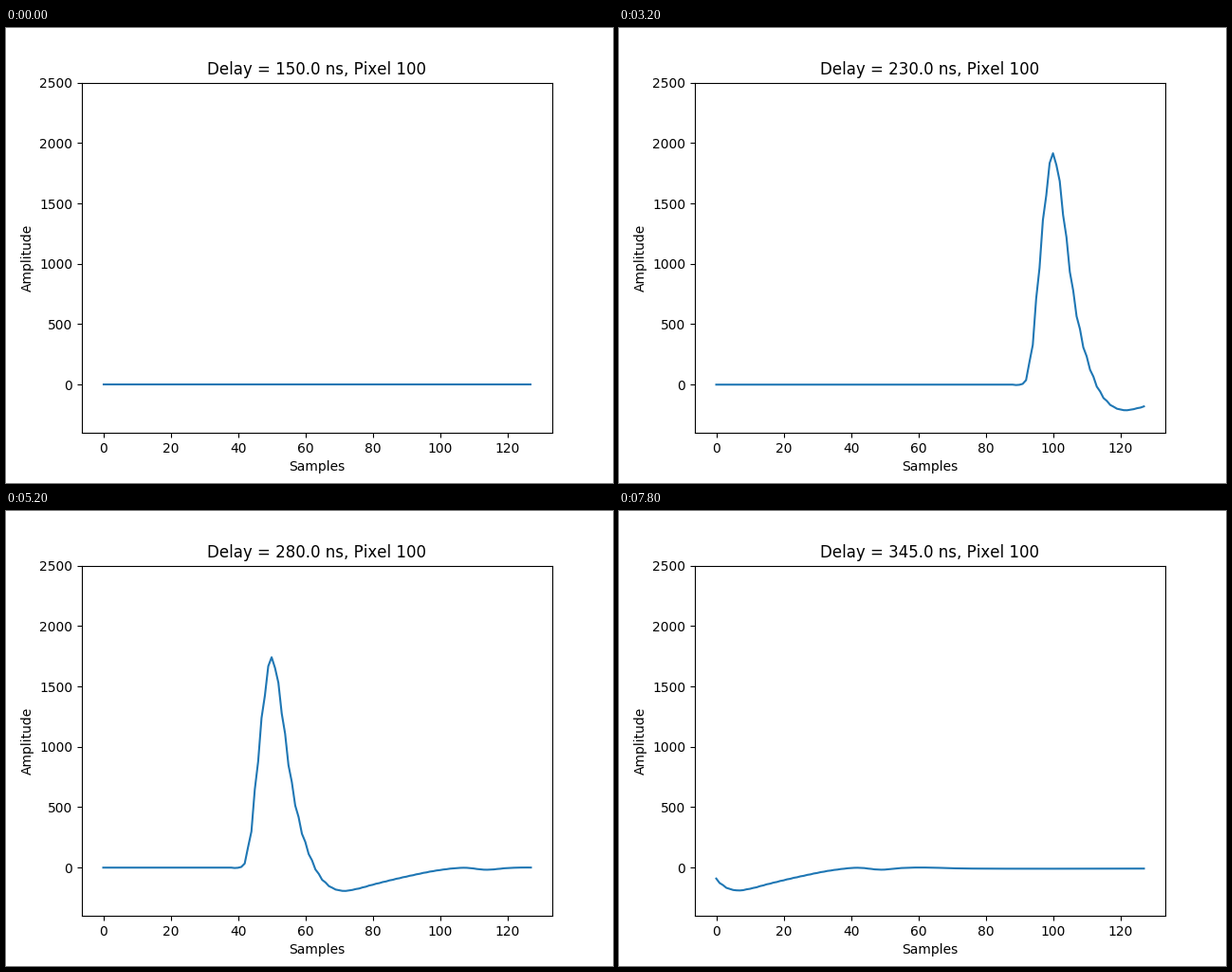
Animation, 640 px wide and 480 px high, one loop 8 s. Source, as a matplotlib script:

```python
import numpy as np
import matplotlib.pyplot as plt
from matplotlib.animation import FuncAnimation

FRAMES, INTERVAL = 40, 200
SAMPLES = np.arange(128)
JITTER = 0.13  # odd samples are taken a little late, even ones early

# Key points of the unit pulse: time from the peak, height
KNOTS, HEIGHTS = np.array([
    (-12, 0), (-10, 0), (-8, .025), (-6, .187), (-4, .525), (-2, .832),
    (0, 1), (2, .865), (4, .62), (6, .393), (8, .231), (11, .07),
    (14, -.033), (17, -.086), (21, -.11), (25, -.102), (30, -.081),
    (40, -.0426), (50, -.0114), (57, -.0006), (64, -.01), (70, -.002),
    (90, -.0045), (150, -.0045),
]).T
SLOPES = np.gradient(HEIGHTS, KNOTS)


def unit_pulse(t):
    """Cubic Hermite curve through the key points."""
    t = np.clip(t, KNOTS[0], KNOTS[-1])
    i = np.clip(np.searchsorted(KNOTS, t) - 1, 0, len(KNOTS) - 2)
    h = KNOTS[i + 1] - KNOTS[i]
    u = (t - KNOTS[i]) / h
    ease = u * u * (3 - 2 * u)
    return (HEIGHTS[i] * (1 - ease) + HEIGHTS[i + 1] * ease
            + h * u * (1 - u) * (SLOPES[i] * (1 - u) - SLOPES[i + 1] * u))


def waveform(delay):
    t = SAMPLES - (330 - delay) + np.where(SAMPLES % 2, JITTER, -JITTER)
    height = 1710 + 250 * np.exp(-max(delay - 225, 0) / 28)
    return height * unit_pulse(t)


plt.rcParams["text.kerning_factor"] = 6  # whole-pixel kerning
fig, ax = plt.subplots(figsize=(6.4, 4.8), dpi=100)
line, = ax.plot(SAMPLES, np.zeros(len(SAMPLES)), color="tab:blue", lw=1.5)
ax.set_ylim(-400, 2500)
ax.set_yticks(range(0, 2501, 500))
ax.set_xlabel("Samples")
ax.set_ylabel("Amplitude")
title = ax.set_title("")


def update(i):
    delay = 150 + 5 * i
    line.set_ydata(waveform(delay))
    title.set_text(f"Delay = {delay:.1f} ns, Pixel 100")
    return line, title


anim = FuncAnimation(fig, update, frames=FRAMES, interval=INTERVAL,
                     repeat=True, repeat_delay=0, blit=False)
plt.show()
```
